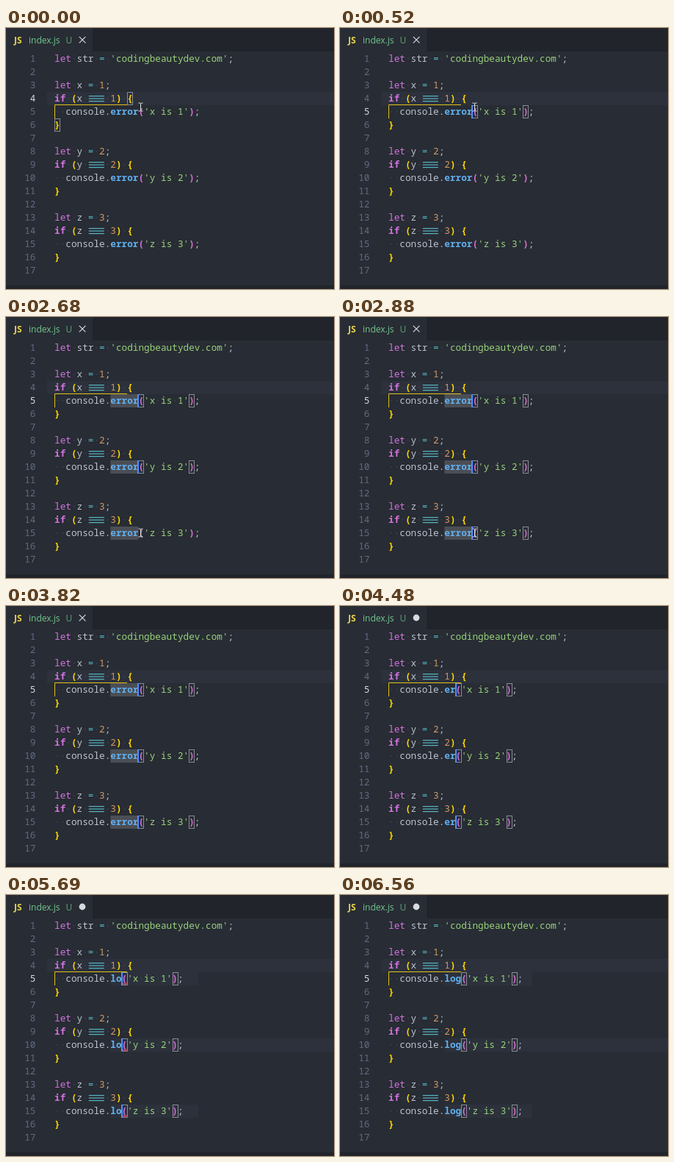
Write an HTML page that moves like this. It is 447 px wide and 355 px high and loops after 6.76 s.

```html
<!DOCTYPE html>
<html lang="en">
<head>
<meta charset="utf-8">
<title>index.js</title>
<style>
  html, body { margin: 0; width: 100%; height: 100%; overflow: hidden; background: #282c34; }
  svg { display: block; width: 447px; height: 355px; }
  text { white-space: pre; }
  .code { font: 500 12.72px "Noto Sans Mono", "DejaVu Sans Mono", monospace; }
  .strong { font-weight: 700; }
  .number { font-weight: 400; }
  .tab { font: 12px "Open Sans", "Noto Sans", sans-serif; }
  .icon { font: 700 12px "Open Sans", "Noto Sans", sans-serif; }
</style>
</head>
<body>
<svg id="stage" viewBox="0 0 447 355"></svg>
<script>
const LOOP = 6760, CW = 7.632, LEFT = 66, ROW = 18, WORD_COL = 10;
const LOG_LINES = [5, 10, 15];
const C = {
  bg: '#282c34', dark: '#21252b', row: '#2c313c', text: '#bcc3d0', keyword: '#d373e0',
  op: '#56b6c2', string: '#98d27a', number: '#d19a66', call: '#61afef',
  gold: '#ffd700', orchid: '#da70d6', dot: '#474d59', gutter: '#5f6b85',
  active: '#d7dae0', word: '#4b4e54', caret: '#528bff', box: '#888c92',
  error: '#e0444c', added: '#73c991'
};
const STRONG = [C.call, C.gold, C.orchid];

const stage = document.getElementById('stage');
const colX = col => LEFT + col * CW;
const rowTop = line => 33 + (line - 1) * ROW;

function add(parent, tag, attrs, content) {
  const el = document.createElementNS('http://www.w3.org/2000/svg', tag);
  for (const k in attrs) el.setAttribute(k, attrs[k]);
  if (content !== undefined) el.textContent = content;
  parent.appendChild(el);
  return el;
}
const rect = (parent, x, y, width, height, fill) =>
  add(parent, 'rect', { x, y, width, height, fill });
const show = (el, on) => el.setAttribute('visibility', on ? 'visible' : 'hidden');
const within = (t, a, b) => t >= a && t < b;

const sources = ["let str = 'codingbeautydev.com';", ''];
['x', 'y', 'z'].forEach((name, i) => {
  const n = i + 1;
  sources.push(`let ${name} = ${n};`, `if (${name} === ${n}) {`,
    `  console.error('${name} is ${n}');`, '}', '');
});

function tokenColor(token, call) {
  if (token === 'let' || token === 'if') return C.keyword;
  if (call && /^[el]\w*$/.test(token)) return C.call;
  if (token[0] === "'") return C.string;
  if (/^\d/.test(token)) return C.number;
  if (token === '=') return C.op;
  if (/[(){}]/.test(token)) return call ? C.orchid : C.gold;
  return C.text;
}

function drawCode(group, source, line) {
  group.textContent = '';
  const y = rowTop(line) + 13, call = source.includes('console');
  for (const m of source.matchAll(/'[^']*'|===|\w+|\s|[^\w\s]/g)) {
    const token = m[0], x = colX(m.index);
    if (token === '===') {
      for (const dy of [-8, -4.5, -1])
        rect(group, x + 1, y + dy, 21, 1.2, C.op);
    } else if (token !== ' ') {
      const fill = tokenColor(token, call);
      const strong = token === 'if' || STRONG.includes(fill);
      add(group, 'text', { class: strong ? 'code strong' : 'code', x, y, fill }, token);
    }
  }
  [...source].forEach((ch, col) => {
    if (ch === ' ') rect(group, colX(col) + 3.2, y - 4.8, 1.3, 1.3, C.dot);
  });
}

// Window and tab
rect(stage, 0, 0, 447, 355, C.bg);
rect(stage, 118, 0, 329, 32, C.dark);
rect(stage, 0, 350, 447, 5, C.dark);
add(stage, 'text', { class: 'icon', x: 11, y: 20.5, fill: '#e8d44d' }, 'JS');
add(stage, 'text', { class: 'tab', x: 31, y: 20.5, fill: C.added }, 'index.js');
add(stage, 'text', { class: 'tab', x: 81.5, y: 20.5, fill: '#5fa578' }, 'U');
const closeMark = add(stage, 'path', { d: 'M99.8 11.8l8.6 8.6m0-8.6l-8.6 8.6',
  stroke: C.active, 'stroke-width': 1.2, fill: 'none' });
const dirtyDot = add(stage, 'circle', { cx: 104, cy: 16, r: 4.4, fill: C.active });

// Editor rows
rect(stage, 56, rowTop(4), 391, ROW, C.row);
const back = LOG_LINES.map(line => ({
  band: rect(stage, colX(WORD_COL), rowTop(line), 120, ROW, C.row),
  word: rect(stage, colX(WORD_COL), rowTop(line), 5 * CW, ROW, C.word)
}));
add(stage, 'path', { d: 'M165 104.5H66.5V123', stroke: '#e2c11a', 'stroke-width': 1, fill: 'none' });

const rows = [], numbers = [];
for (let line = 1; line <= 17; line++) {
  numbers[line] = add(stage, 'text', { class: 'code number', x: 40.5, y: rowTop(line) + 13,
    'text-anchor': 'end', fill: C.gutter }, line);
  rows[line] = add(stage, 'g', {});
  drawCode(rows[line], sources[line - 1], line);
}

function bracketBox(parent, col, line) {
  return add(parent, 'rect', { x: Math.round(colX(col)) + 0.5, y: rowTop(line) + 0.5,
    width: 7, height: ROW - 1, fill: 'none', stroke: C.box });
}
const braces = add(stage, 'g', {});
bracketBox(braces, 13, 4);
bracketBox(braces, 0, 6);

const edits = LOG_LINES.map(line => {
  const group = add(stage, 'g', {});
  const boxes = add(group, 'g', {});
  bracketBox(boxes, 0, line);
  bracketBox(boxes, 9, line);
  const x = LEFT, y = rowTop(line);
  return {
    group, boxes,
    squiggle: add(group, 'path', { d: `M${x} ${y + 17}l2-2 2 2 2-2 2 2`,
      stroke: C.error, fill: 'none', 'stroke-width': 1.1 }),
    caret: rect(group, x - 1, y, 2, ROW, C.caret)
  };
});
const firstCaret = rect(stage, colX(14) - 0.5, rowTop(4), 1.5, ROW, C.caret);

// Pointer
const pointer = add(stage, 'g', {});
const press = add(pointer, 'circle', { r: 12, fill: '#c4b820', 'fill-opacity': 0.8 });
add(pointer, 'path', { d: 'M-3-5.5H-1L0-4.5 1-5.5H3M0-4.5V4.5M-3 5.5H-1L0 4.5 1 5.5H3',
  stroke: '#e6e6e6', 'stroke-width': 1, fill: 'none' });

const CLICKS = [[390, 460], [1660, 1730], [2810, 2880]];
const CARET_OFF = [[960, 1460], [2230, 2550], [3340, 3820], [5360, 5490], [6360, LOOP]];
const WORDS = [[0, 'error'], [4150, 'erro'], [4350, 'err'], [4480, 'er'], [4680, 'e'],
  [4830, ''], [5490, 'l'], [5690, 'lo'], [5890, 'log']];

function glide(t, start, end) {
  const p = Math.min(1, Math.max(0, (t - start) / (end - start)));
  return p * p * (3 - 2 * p);
}

let shownWord = 'error';
function setWord(word) {
  if (word === shownWord) return;
  shownWord = word;
  for (const line of LOG_LINES)
    drawCode(rows[line], sources[line - 1].replace('error', word), line);
}

function render(t) {
  const word = WORDS.filter(w => w[0] <= t).pop()[1];
  setWord(word);

  const dirty = t >= 4150;
  show(closeMark, !dirty);
  show(dirtyDot, dirty);

  const moved = t >= CLICKS[0][1];
  numbers[4].setAttribute('fill', moved ? C.gutter : C.active);
  numbers[5].setAttribute('fill', moved ? C.active : C.gutter);
  show(braces, !moved);
  show(firstCaret, within(t, 60, 460));

  const caretOn = !CARET_OFF.some(([a, b]) => within(t, a, b));
  const shift = (WORD_COL + word.length) * CW;
  edits.forEach((edit, i) => {
    const on = t >= CLICKS[i][1];
    // Whole pixels keep the thin boxes crisp
    edit.group.setAttribute('transform', `translate(${Math.round(shift)} 0)`);
    show(edit.boxes, on);
    show(edit.caret, on && caretOn);
    show(edit.squiggle, within(t, 5160, 6220));
    show(back[i].word, within(t, 720, 4150));
    show(back[i].band, t >= 5160);
    back[i].band.setAttribute('width', i === 1 && t >= 5690 ? 305 : 120);
  });

  const down = glide(t, 740, 1460), further = glide(t, 1820, 2480);
  const away = t >= 3270;
  const x = away ? 406 : 183.5 - 2.5 * down + 2.5 * further;
  const y = away ? 316 : 107.5 + 96.5 * down + 89.5 * further;
  pointer.setAttribute('transform', `translate(${x.toFixed(2)} ${y.toFixed(2)})`);
  show(pointer, t < 3340);
  show(press, CLICKS.some(([a, b]) => within(t, a, b)));
}

const start = performance.now();
function tick() {
  render((performance.now() - start) % LOOP);
  requestAnimationFrame(tick);
}
tick();
</script>
</body>
</html>
```
